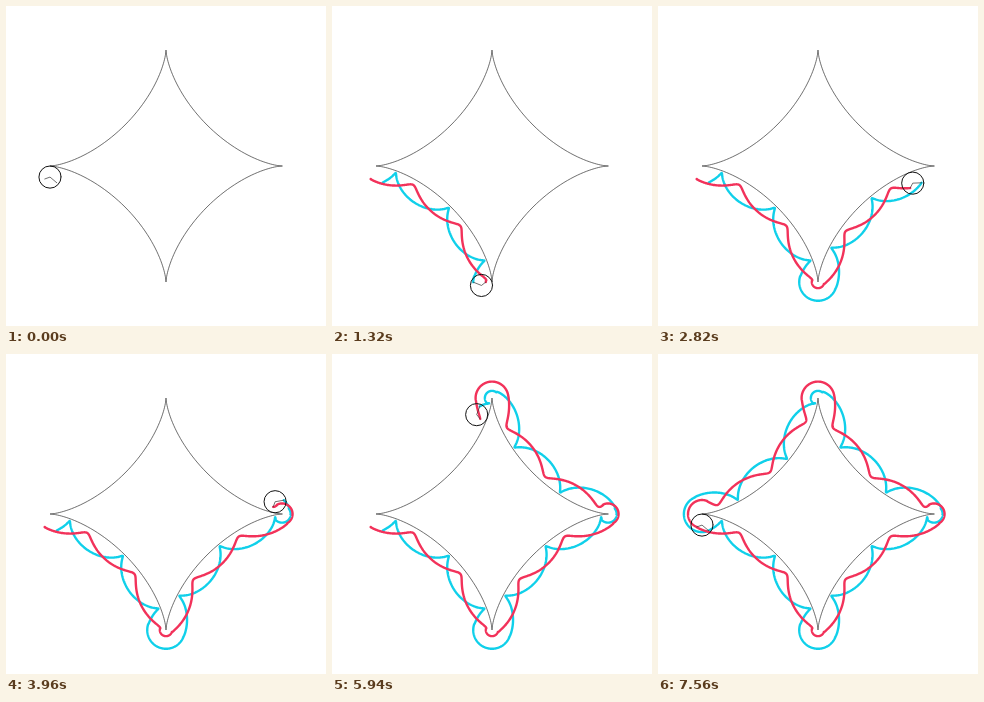
Animation, 320 px wide and 320 px high, one loop 8.26 s. Source, as an HTML page with a canvas:

```html
<!DOCTYPE html>
<html>
<head>
<meta charset="utf-8">
<style>
html, body { margin: 0; height: 100%; overflow: hidden; background: #fff; }
canvas { display: block; }
</style>
</head>
<body>
<canvas id="stage" width="320" height="320"></canvas>
<script>
const ctx = document.getElementById('stage').getContext('2d');
const { PI, sin, cos, min, floor } = Math;

const LOOP = 8260, STEP = 60, LAP = 7540, LAST = 7560;
const SIZE = 116;                    // centre to cusp of the astroid
const RADIUS = 1.5 * SIZE / (5 * PI); // two and a half turns per side
const SAMPLES = 1600;
const pens = [
  { color: '#10d0ea', reach: 0.8 * RADIUS, angle: 40 * PI / 180 },
  { color: '#f2325a', reach: 0.5 * RADIUS, angle: 160 * PI / 180 }
];

// Wheel centre and spin at lap progress u: two thirds of each quarter
// rolls along a side, the last third pivots around the cusp.
function wheelAt(u) {
  const quarter = min(3, floor(u * 4));
  const part = (u * 4 - quarter) * 3;
  let x, y, normal, spin;
  if (part < 2) {
    const th = part * PI / 4;
    x = -SIZE * cos(th) ** 3;
    y = SIZE * sin(th) ** 3;
    normal = PI / 2 + th;
    spin = -5 * PI * sin(th) ** 2;
  } else {
    const turn = (part - 2) * PI;
    x = 0;
    y = SIZE;
    normal = PI - turn;
    spin = -5 * PI - turn;
  }
  x += RADIUS * cos(normal);
  y += RADIUS * sin(normal);
  for (let i = 0; i < quarter; i++) [x, y] = [y, -x];
  return { x, y, spin };
}

function penAt(pen, u) {
  const { x, y, spin } = wheelAt(u);
  const a = pen.angle + spin;
  return [x + pen.reach * cos(a), y + pen.reach * sin(a)];
}

function stroke(color, width, build) {
  ctx.beginPath();
  build();
  ctx.strokeStyle = color;
  ctx.lineWidth = width;
  ctx.stroke();
}

function draw(progress) {
  ctx.setTransform(1, 0, 0, 1, 0, 0);
  ctx.fillStyle = '#fff';
  ctx.fillRect(0, 0, 320, 320);
  ctx.translate(160, 160);
  ctx.lineCap = ctx.lineJoin = 'round';

  stroke('#333', 0.7, () => {
    for (let i = 0; i <= 240; i++) {
      const th = i * PI / 120;
      ctx.lineTo(SIZE * cos(th) ** 3, SIZE * sin(th) ** 3);
    }
  });

  if (progress > 0) {
    for (const pen of pens) {
      stroke(pen.color, 2.4, () => {
        for (let i = 0; i < progress * SAMPLES; i++) ctx.lineTo(...penAt(pen, i / SAMPLES));
        ctx.lineTo(...penAt(pen, progress));
      });
    }
  }

  const wheel = wheelAt(progress);
  stroke('#111', 1, () => ctx.arc(wheel.x, wheel.y, RADIUS, 0, 2 * PI));
  stroke('#333', 0.7, () => {
    ctx.moveTo(...penAt(pens[0], progress));
    ctx.lineTo(wheel.x, wheel.y);
    ctx.lineTo(...penAt(pens[1], progress));
  });
}

const start = performance.now();
function tick() {
  const t = (performance.now() - start) % LOOP;
  draw(min(1, floor(min(t, LAST) / STEP) * STEP / LAP));
  requestAnimationFrame(tick);
}
tick();
</script>
</body>
</html>
```
